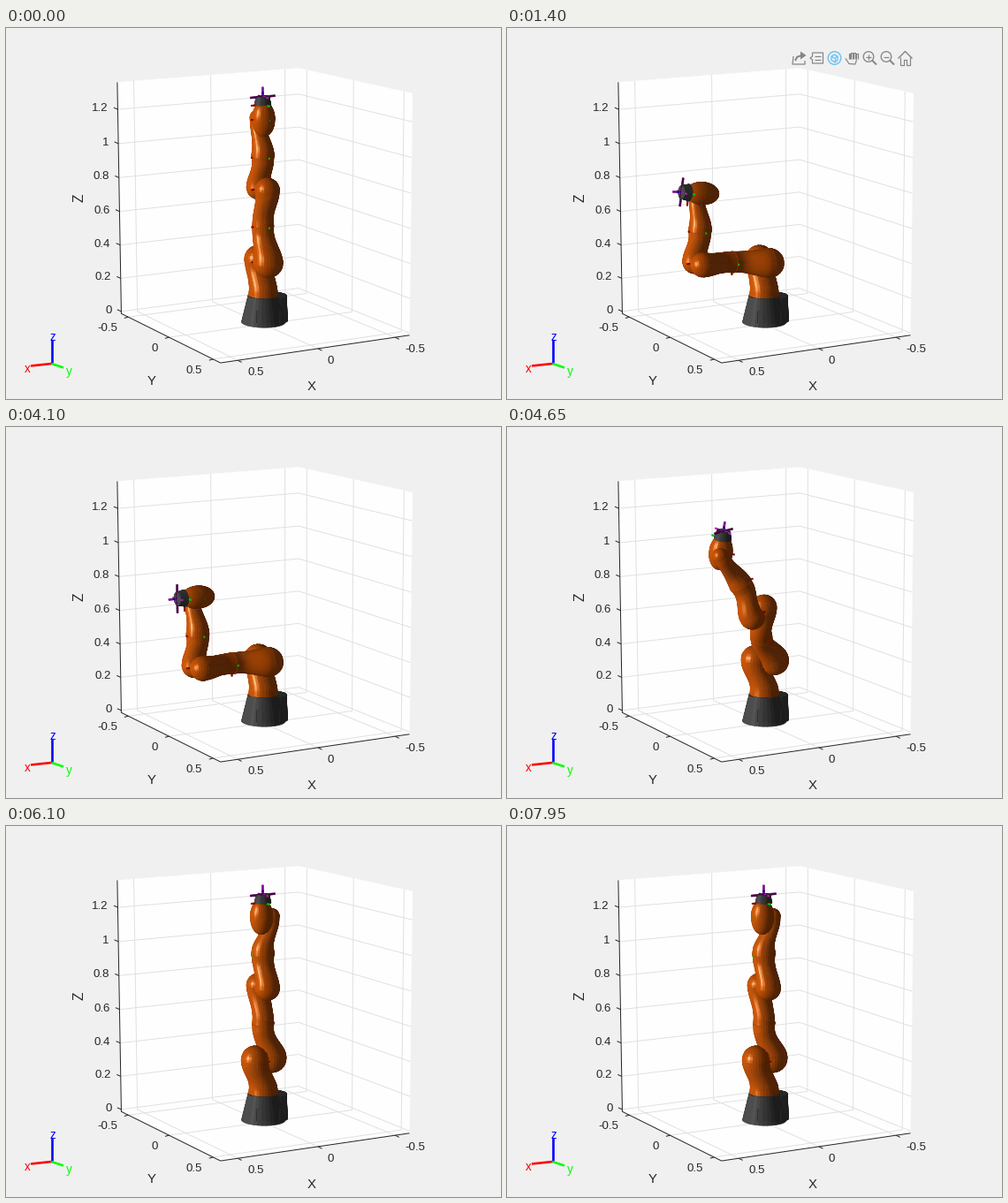
These frames come from a looping animation (560 by 420 pixels, 8 s). A matplotlib script:

```python
import numpy as np
import matplotlib.pyplot as plt
from matplotlib.animation import FuncAnimation
from matplotlib.collections import PolyCollection
from matplotlib.patches import Circle, Polygon

W, H, FRAMES, STEP = 560, 420, 160, 50
PX = 0.72  # points per pixel at 100 dpi
INK = (0.15, 0.15, 0.15)
ORANGE, GREY = (1, 0.4235, 0.0392), (0.37, 0.37, 0.37)
RGB = [(0.5, 0, 0), (0, 0.75, 0), (0, 0, 0.6)]

XL, YL, ZL = (0.605, -0.595), (-0.59, 0.58), (-0.013, 1.357)
AZ, EL = np.radians(29.2), np.radians(14.5)
VIEW = np.array([np.sin(AZ) * np.cos(EL), np.cos(AZ) * np.cos(EL), np.sin(EL)])
LIGHT = np.array([1, 0, 0.25]) / np.hypot(1, 0.25)


def calibrate():
    """Camera matrix that sends the corners of the plot box to the stage."""
    (x0, x1), (y0, y1), (z0, z1) = XL, YL, ZL
    pairs = [((x0, y0, z0), (130, 321)), ((x0, y1, z0), (243, 381)),
             ((x1, y1, z0), (456, 346)), ((x1, y0, z0), (331.5, 299)),
             ((x0, y0, z1), (126, 62)), ((x1, y0, z1), (331, 45)),
             ((x1, y1, z1), (460, 74))]
    rows = []
    for p, (u, v) in pairs:
        q, zero = np.array([*p, 1.0]), np.zeros(4)
        rows += [np.r_[q, zero, -u / 400 * q], np.r_[zero, q, -v / 400 * q]]
    return np.linalg.svd(np.array(rows))[2][-1].reshape(3, 4)


CAM = calibrate()


def project(p):
    q = np.asarray(p, float) @ CAM[:, :3].T + CAM[:, 3]
    return 400 * q[..., :2] / q[..., 2:]


def rot(axis, deg):
    c, s = np.cos(np.radians(deg)), np.sin(np.radians(deg))
    if axis == "z":
        return np.array([[c, -s, 0], [s, c, 0], [0, 0, 1]])
    return np.array([[c, 0, s], [0, 1, 0], [-s, 0, c]])


def smooth(s):
    s = np.clip(s, 0, 1)
    return s * s * (3 - 2 * s)


# robot shells

S = np.linspace(0, 1, 20)


def tube(z, y, r, caps=(0, 0), x=0.0, sides=32):
    """Faces and normals of a bent tube; caps give the height of each dome."""
    a = np.linspace(0, np.pi / 2, 9)[1:]
    low = a[::-1]
    z, y, r = (np.r_[z[0] - caps[0] * r[0] * np.sin(low), z,
                     z[-1] + caps[1] * r[-1] * np.sin(a)],
               np.pad(y, len(a), mode="edge"),
               np.r_[r[0] * np.cos(low), r, r[-1] * np.cos(a)])
    t = np.linspace(0, 2 * np.pi, sides + 1)
    p = np.stack([x + np.outer(r, np.cos(t)),
                  y[:, None] + np.outer(r, np.sin(t)),
                  np.repeat(z[:, None], sides + 1, 1)], -1)
    q = np.stack([p[:-1, :-1], p[:-1, 1:], p[1:, 1:], p[1:, :-1]], 2).reshape(-1, 4, 3)
    n = np.cross(q[:, 2] - q[:, 0], q[:, 3] - q[:, 1])
    return q, n / (np.linalg.norm(n, axis=1, keepdims=True) + 1e-12)


def cone(height, r0, r1, x=0.0):
    return tube(height * S, 0 * S, r0 + (r1 - r0) * S, x=x)


def arm(length, side, slim, big, flip=False):
    """Tube that swings from the joint axis to a domed end at one side."""
    y = side * smooth((S - 0.15) / 0.75)
    r = slim + (big - slim) * smooth(S) - 0.006 * np.sin(np.pi * S)
    if flip:
        return tube(length * S, y[::-1], r[::-1], (1, 0))
    return tube(length * S, y, r, (0, 1))


def egg(low, high, r, reach):
    z = low + (high - low) * S
    return tube(z, 0 * S + 0.008, r * np.sqrt(1 - (z / reach) ** 2))


OFFSETS = [0.1575, 0.2025, 0.2045, 0.2155, 0.1845, 0.2155, 0.081]
TOOL = 0.045
SHELLS = [  # link, colour, mesh
    (0, GREY, cone(OFFSETS[0], 0.123, 0.085)),
    (0, GREY, cone(0.15, 0.073, 0.066, x=-0.075)),
    (1, ORANGE, arm(OFFSETS[1], -0.05, 0.082, 0.08)),
    (2, ORANGE, arm(OFFSETS[2], 0.055, 0.06, 0.083, flip=True)),
    (3, ORANGE, arm(OFFSETS[3], 0.048, 0.06, 0.068)),
    (4, ORANGE, arm(OFFSETS[4], -0.048, 0.062, 0.068, flip=True)),
    (5, ORANGE, arm(OFFSETS[5], -0.058, 0.064, 0.042)),
    (6, ORANGE, egg(-0.094, OFFSETS[6], 0.063, 0.1)),
    (7, GREY, cone(TOOL, 0.046, 0.036)),
]


def settle(t, tau, p):
    return 1 - np.exp(-(max(t, 0) / tau) ** p)


def joints(t):
    """Bend at three joints, then twist back to upright from 4 s on."""
    back = settle(t - 4, 0.69, 2.3)
    bends = [90 * (1 - back) * settle(t, tau, p)
             for tau, p in [(0.81, 2), (0.67, 1.9), (0.6, 1.25)]]
    twist = 90 * back
    shoulder, elbow, wrist = bends
    return [twist, shoulder, twist, -elbow, twist, wrist, twist]


def chain(angles):
    r, p = np.eye(3), np.zeros(3)
    poses = [(r, p)]
    for i, (dz, angle) in enumerate(zip(OFFSETS, angles)):
        p = p + r[:, 2] * dz
        r = r @ rot("zy"[i % 2], angle)
        poses.append((r, p))
    return poses


def rod(a, b, color, width=1.5, n=6):
    """Thin line cut in pieces so that it can be sorted with the faces."""
    pts = a + np.linspace(0, 1, n + 1)[:, None] * (b - a)
    s = project(pts)
    d = s[-1] - s[0]
    side = np.array([-d[1], d[0]]) / (np.hypot(*d) + 1e-9) * width / 2
    quads = np.stack([s[:-1] + side, s[1:] + side, s[1:] - side, s[:-1] - side], 1)
    return quads, (pts[:-1] + pts[1:]) @ VIEW / 2, np.tile(color, (n, 1))


def shade(n, color):
    lit = n @ LIGHT
    mirror = np.clip(2 * lit * (n @ VIEW) - LIGHT @ VIEW, 0, 1) * (lit > 0)
    shine = 0.45 if color == ORANGE else 0.05
    body = (0.3 + 0.5 * np.clip(lit, 0, 1))[:, None] * np.array(color)
    return np.clip(body + shine * (mirror ** 18)[:, None], 0, 1)


def robot(t):
    poses = chain(joints(t))
    parts = []
    for k, color, (quads, normals) in SHELLS:
        r, p = poses[k]
        n = normals @ r.T
        seen = n @ VIEW > -0.02
        world = quads[seen] @ r.T + p
        parts.append((project(world), world.mean(1) @ VIEW, shade(n[seen], color)))
    for r, p in poses[1:]:
        parts += [rod(p, p + 0.075 * r[:, i], RGB[i]) for i in range(3)]
    r, p = poses[-1]
    tip = p + TOOL * r[:, 2]
    spots = [q for _, q in poses] + [tip]
    parts += [rod(a, b, (0, 0.447, 0.741), 1) for a, b in zip(spots, spots[1:])]
    x, y, z = r.T
    parts += [rod(tip - 0.08 * x, tip + 0.08 * x, (0.27, 0, 0.27), 2),
              rod(tip - 0.05 * y, tip + 0.06 * y, (0.75, 0.1, 0.75)),
              rod(tip, tip + 0.055 * z, (0.5, 0.05, 0.55), 2)]
    verts, depth, colors = (np.concatenate(c) for c in zip(*parts))
    order = np.argsort(depth)
    return verts[order], colors[order]


# stage

fig = plt.figure(figsize=(W / 100, H / 100), dpi=100, facecolor="#f0f0f0")
ax = fig.add_axes([0, 0, 1, 1])
ax.set_xlim(0, W)
ax.set_ylim(H, 0)
ax.axis("off")


def line(pts, color=INK, width=1.0, z=2):
    p = np.asarray(pts, float)
    return ax.plot(p[:, 0], p[:, 1], color=color, lw=width * PX, zorder=z,
                   solid_capstyle="butt")[0]


def label(x, y, s, size=13.2, color=INK, ha="center", **kw):
    ax.text(x, y, s, fontsize=size * PX, color=color, family="Liberation Sans",
            ha=ha, va="center_baseline", **kw)


def ticks(points, names, mark, gap, ha):
    for p, name in zip(points, names):
        a = project(p)
        line([a, a + mark])
        label(*(a + gap), name, ha=ha)


def draw_box():
    (x0, x1), (y0, y1), (z0, z1) = XL, YL, ZL
    walls = [[(x0, y0, z0), (x1, y0, z0), (x1, y0, z1), (x0, y0, z1)],
             [(x1, y0, z0), (x1, y1, z0), (x1, y1, z1), (x1, y0, z1)],
             [(x0, y0, z0), (x0, y1, z0), (x1, y1, z0), (x1, y0, z0)]]
    for w in walls:
        ax.add_patch(Polygon(project(w), fc="#fefefe", ec="#fefefe", lw=0.3, zorder=0))
    steps, levels = (-0.5, 0, 0.5), np.arange(7) * 0.2
    grid = [[(v, y1, z0), (v, y0, z0), (v, y0, z1)] for v in steps]
    grid += [[(x0, v, z0), (x1, v, z0), (x1, v, z1)] for v in steps]
    grid += [[(x0, y0, v), (x1, y0, v), (x1, y1, v)] for v in levels]
    for g in grid:
        line(project(g), "#dedede", 0.9, 1)
    line(project([(x0, y0, z1), (x0, y0, z0), (x0, y1, z0), (x1, y1, z0)]))
    names = [f"{v:g}" for v in steps]
    ticks([(v, y1, z0) for v in steps], names, (4.5, 2.2), (11, 12.5), "left")
    ticks([(x0, v, z0) for v in steps], names, (-4.5, 1.2), (-12.5, 11.5), "right")
    ticks([(x0, y0, v) for v in levels], [f"{v:.2g}" for v in levels],
          (-4.5, -2), (-11, -2.5), "right")
    label(165, 399, "Y", 15)
    label(346, 405, "X", 15)
    ax.text(83, 192, "Z", fontsize=15.5 * PX, color=INK, rotation=90, ha="center",
            va="center", family="Liberation Sans")


def draw_triad():
    o = np.array([51.5, 380])
    for d, color, s in [((0, -27), "#0000ff", "z"), ((-23.5, 2.5), "#ff0000", "x"),
                        ((13.5, 4.5), "#00ff00", "y")]:
        d = np.array(d)
        line([o, o + d], color, 2.6, 4)
        label(*(o + d + 5.5 * d / np.hypot(*d) + (1.5, 1)), s, 13.5, color)


def draw_toolbar():
    grey, blue = "#858585", "#6cbcec"
    out = []

    def pen(*pts, color=grey, width=1.2):
        out.append(line(pts, color, width, 8))

    def ring(x, y, r, color=grey, fill="none"):
        out.append(ax.add_patch(Circle((x, y), r, fc=fill, ec=color,
                                       lw=1.3 * PX, zorder=8)))

    # export
    pen((324, 32), (323, 41), (337, 41), (337, 37))
    pen((326, 37), (328, 33), (333, 31), width=2)
    out.append(ax.add_patch(Polygon([(332, 26.5), (338.5, 31), (332, 35.5)],
                                    fc=grey, ec="none", zorder=8)))
    # brush
    pen((345.5, 28), (357.5, 28), (357.5, 40), (345.5, 40), (345.5, 36),
        (343, 34), (345.5, 32), (345.5, 28))
    for y in (32, 36):
        pen((348, y), (355, y))
    # rotate
    ring(370.5, 34, 7.3, blue, "#dff1fb")
    cube = [(370.5 + 4 * np.sin(a), 34.3 - 4.3 * np.cos(a))
            for a in np.arange(7) * np.pi / 3]
    pen(*cube, color=blue)
    for corner in cube[1:6:2]:
        pen((370.5, 34.3), corner, color=blue)
    # pan
    pen((383, 34.5), (387, 40.5), (394, 41), (395.5, 36))
    for i in range(4):
        x, top = 386.5 + 2.8 * i, 27.5 + 0.6 * (i - 1.3) ** 2
        pen((x, 35), (x, top), (x + 1.6, top), (x + 1.6, 35))
    # zoom
    for x in (409, 429):
        ring(x, 32.5, 5.8)
        pen((x + 4, 36.5), (x + 9, 41.5), width=2)
        pen((x - 3, 32.5), (x + 3, 32.5))
    pen((409, 29.5), (409, 35.5))
    # home
    pen((442.5, 34.5), (450.5, 26.5), (458.5, 34.5), width=1.4)
    pen((445, 33), (445, 41.5), (449, 41.5), (449, 36), (452, 36),
        (452, 41.5), (456, 41.5), (456, 33))
    return out


draw_box()
draw_triad()
toolbar = draw_toolbar()
for x in (284, 310):
    line([(x, 320), (x - 0.5, 334)], (0.16, 0.16, 0.16), 1, 6)
body = PolyCollection([], linewidths=0.6 * PX, zorder=5)
body.set_snap(False)
ax.add_collection(body, autolim=False)


def update(i):
    t = i * STEP / 1000
    verts, colors = robot(t)
    body.set_verts(verts)
    body.set_facecolor(colors)
    body.set_edgecolor(colors)
    for part in toolbar:
        part.set_visible(0.15 <= t < 3.1)
    return [body, *toolbar]


anim = FuncAnimation(fig, update, frames=FRAMES, interval=STEP, repeat=True,
                     init_func=lambda: update(0), blit=False)
plt.show()
```
